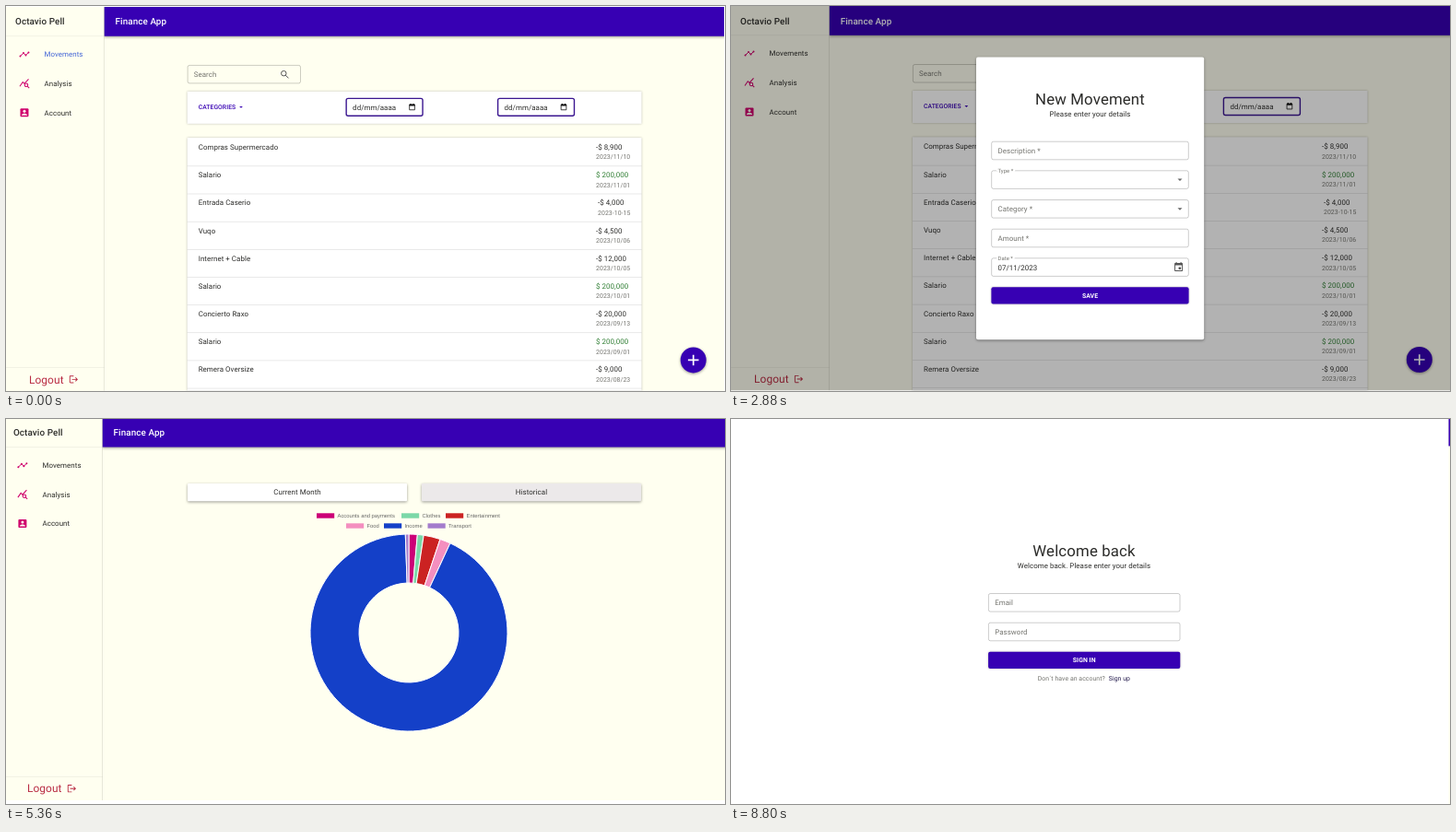
An HTML page for the animation above (8.88 s loop, 780 px wide and 418 px high).

```html
<!DOCTYPE html>
<html lang="en">
<head>
<meta charset="utf-8">
<title>Finance App</title>
<style>
html, body { margin: 0; width: 780px; height: 418px; overflow: hidden; background: #fff; }
#reel { display: flex; width: 3900px; height: 418px; animation: cuts 8880ms step-end infinite; }
#reel svg { flex: none; display: block; overflow: hidden; }
text { font-family: Roboto, "Open Sans", sans-serif; letter-spacing: .009em; text-rendering: geometricPrecision; white-space: pre; }
.chart text { font-family: "Liberation Sans", Arial, sans-serif; letter-spacing: 0; }
.bar { filter: drop-shadow(0 1.2px 1.5px rgba(0,0,0,.4)); }
.paper { filter: drop-shadow(0 .6px .8px rgba(0,0,0,.28)); }
@keyframes cuts {
  0% { transform: translateX(0); }
  17.1% { transform: translateX(-780px); }
  49.54% { transform: translateX(-1560px); }
  66.65% { transform: translateX(-2340px); }
  83.77%, 100% { transform: translateX(-3120px); }
}
</style>
</head>
<body>
<div id="reel"></div>
<script>
const IVORY = '#fffff0', PURPLE = '#3700b3', PINK = '#cf006c', INK = '#2c2c2a',
      GREY = '#74746f', RED = '#b92c43', GREEN = '#2e7d32', LINE = 'rgba(0,0,0,.25)';
const USER = 'Octavio Pell';

// cy is the middle of the capital letters
function text(x, cy, str, o = {}) {
  const { size = 7.9, fill = INK, weight = 400, anchor = 'start', extra = '' } = o;
  return `<text x="${x}" y="${cy + size * .355}" font-size="${size}" font-weight="${weight}" fill="${fill}" text-anchor="${anchor}" ${extra}>${str}</text>`;
}
const mid = (x, cy, str, o = {}) => text(x, cy, str, { ...o, anchor: 'middle' });
const rect = (x, y, w, h, fill, extra = '') =>
  `<rect x="${x}" y="${y}" width="${w}" height="${h}" fill="${fill}" ${extra}/>`;
const outline = (x, y, w, h, stroke = LINE, sw = .8) =>
  rect(x, y, w, h, 'none', `rx="2" stroke="${stroke}" stroke-width="${sw}"`);

const shapes = {
  timeline: c => `<path d="M3 16 10 9 15 14 21 8" fill="none" stroke="${c}" stroke-width="2"/>` +
    [[3, 16], [10, 9], [15, 14], [21, 8]].map(([x, y]) => `<circle cx="${x}" cy="${y}" r="2" fill="${c}"/>`).join(''),
  stats: c => `<g fill="none" stroke="${c}" stroke-width="2.1"><path d="M2 18.5 8.5 9 12 12.5 21 2.5M18.5 18 22.5 22"/><circle cx="16" cy="15.5" r="3.5"/></g>`,
  account: c => rect(3, 3, 18, 18, c, 'rx="2"') +
    `<g fill="${IVORY}"><circle cx="12" cy="9" r="3"/><path d="M6 18v-1c0-2 4-3.1 6-3.1s6 1.1 6 3.1v1z"/></g>`,
  logout: c => `<path fill="${c}" d="M17 7l-1.41 1.41L18.17 11H8v2h10.17l-2.58 2.58L17 17l5-5zM4 5h8V3H4c-1.1 0-2 .9-2 2v14c0 1.1.9 2 2 2h8v-2H4z"/>`,
  search: c => `<g fill="none" stroke="${c}" stroke-width="2"><circle cx="9.5" cy="9.5" r="5.5"/><path d="M13.5 13.5 20 20"/></g>`,
  event: c => `<path fill="${c}" d="M17 12h-5v5h5zM16 1v2H8V1H6v2H5c-1.1 0-2 .9-2 2v14c0 1.1.9 2 2 2h14c1.1 0 2-.9 2-2V5c0-1.1-.9-2-2-2h-1V1zm3 18H5V8h14z"/>`,
  picker: c => `<path fill="none" stroke="${c}" stroke-width="2.2" d="M4 5h16v16H4z"/><path fill="${c}" d="M4 4h16v5H4zM6 2h3v3H6zM15 2h3v3h-3z"/>`,
  arrow: c => `<path fill="${c}" d="M7 10l5 5 5-5z"/>`,
  person: c => `<g fill="none" stroke="${c}" stroke-width="2"><circle cx="12" cy="12" r="9"/><circle cx="12" cy="9.5" r="2.6"/><path d="M6 18.2c1.5-1.8 3.7-2.7 6-2.7s4.500.9 6 2.7"/></g>`
};
const icon = (name, cx, cy, size, color = INK) =>
  `<g transform="translate(${cx - size / 2} ${cy - size / 2}) scale(${size / 24})">${shapes[name](color)}</g>`;

// page frame: header bar and sidebar, shifted by (dx, dy), page ending at `bottom`
function shell(dx, dy, outY, bottom, active) {
  const edge = 106.6 + dx, top = 31.8 + dy;
  const items = [['Movements', 'timeline'], ['Analysis', 'stats'], ['Account', 'account']];
  return rect(0, 0, 782, bottom, IVORY) +
    rect(edge, 0, 790 - edge, top, PURPLE, 'class="bar"') +
    rect(0, 0, edge, bottom, IVORY) +
    rect(edge - .5, 0, .6, bottom, 'rgba(0,0,0,.16)') +
    rect(0, top - .2, edge, .5, 'rgba(0,0,0,.1)') +
    rect(0, outY - 13, edge, .5, 'rgba(0,0,0,.1)') +
    text(10 + dx, 16 + dy, USER, { size: 9.9, weight: 500 }) +
    text(118.7 + dx, 16 + dy, 'Finance App', { size: 9.9, weight: 500, fill: '#fff' }) +
    items.map(([label, name], i) => {
      const y = 51.5 + dy + 31.7 * i;
      return icon(name, 20 + dx, y, 12, PINK) +
        text(41.6 + dx, y, label, { fill: label === active ? '#4365d6' : INK });
    }).join('') +
    text(25 + dx, outY, 'Logout', { size: 11.9, fill: RED }) +
    icon('logout', 73.5 + dx, outY, 11, RED);
}

function dateBox(x) {
  return outline(x, 99.5, 83, 19, '#3b1690', 1.4) + text(x + 7, 109, 'dd/mm/aaaa') +
    icon('picker', x + 71.5, 108.7, 8.6, '#111');
}

const rows = [
  ['Compras Supermercado', '-$ 8,900', '2023/11/10'],
  ['Salario', '$ 200,000', '2023/11/01'],
  ['Entrada Caserio', '-$ 4,000', '2023-10-15'],
  ['Vuqo', '-$ 4,500', '2023/10/06'],
  ['Internet + Cable', '-$ 12,000', '2023/10/05'],
  ['Salario', '$ 200,000', '2023/10/01'],
  ['Concierto Raxo', '-$ 20,000', '2023/09/13'],
  ['Salario', '$ 200,000', '2023/09/01'],
  ['Remera Oversize', '-$ 9,000', '2023/08/23']
];

function movements(active) {
  const list = rows.map(([name, sum, date], i) => {
    const y = 152.5 + 30.2 * i, x = date.includes('-') ? 643 : 641;
    return text(209, y, name) +
      text(x, y, sum, { fill: sum[0] === '$' ? GREEN : INK }) +
      text(x, y + 10.8, date, { size: 6.9, fill: GREY }) +
      rect(197, y + 20.3, 493.500, .6, 'rgba(0,0,0,.15)');
  }).join('');
  return shell(0, 0, 405, 417.3, active) +
    outline(197.4, 63.5, 122.6, 19.5) + text(204, 73.5, 'Search', { fill: GREY }) +
    icon('search', 303, 73.5, 12, '#555') +
    rect(197, 92, 493.5, 35, '#fff', 'class="paper"') +
    text(209, 108.7, 'CATEGORIES', { size: 6.8, weight: 500, fill: PURPLE }) +
    icon('arrow', 255.4, 108.8, 9, PURPLE) +
    dateBox(369.7) + dateBox(534.4) +
    rect(197, 142.3, 493.5, 275, '#fff', 'class="paper"') + list +
    `<circle cx="746.8" cy="384" r="14" fill="${PURPLE}" class="bar"/>` +
    `<path d="M741 384h11.6M746.8 378.2v11.6" stroke="#fff" stroke-width="1.7"/>`;
}

// outlined input; a label sits in a gap of the top border
function field(x, y, w, { value = '', hint = '', label = '', bg = '#fff', indent = 6.8 }) {
  return outline(x, y, w, 19.6) +
    (hint && text(x + 6.8, y + 9.9, hint, { fill: GREY })) +
    (value && text(x + indent, y + 9.9, value)) +
    (label && text(x + 6.8, y + .3, label, { size: 5.9, fill: GREY, extra: `paint-order="stroke" stroke="${bg}" stroke-width="3.5"` }));
}
const button = (x, y, w, label, fill = PURPLE) =>
  rect(x, y, w, 18.2, fill, 'rx="2" class="paper"') +
  mid(x + w / 2, y + 8.9, label, { size: 6.9, weight: 600, fill: '#fff' });

function modal() {
  const x = 282.7, w = 213.6;
  return rect(0, 0, 780, 417.3, 'rgba(0,0,0,.3)') +
    rect(266, 55.4, 247.2, 306.8, '#fff', 'rx="2" class="bar"') +
    mid(389.5, 101, 'New Movement', { size: 16.8 }) +
    mid(389.5, 117.2, 'Please enter your details') +
    field(x, 147.2, w, { hint: 'Description *' }) +
    field(x, 178.8, w, { label: 'Type *' }) + icon('arrow', 487, 188.6, 12, '#666') +
    field(x, 210.5, w, { hint: 'Category *' }) + icon('arrow', 487, 220.3, 12, '#666') +
    field(x, 242.2, w, { hint: 'Amount *' }) +
    field(x, 273.8, w, { label: 'Date *', value: '07/11/2023' }) + icon('event', 485.6, 283.5, 12, '#555') +
    button(x - .3, 305.2, w + .6, 'SAVE');
}

const slices = [
  ['Accounts and payments', '#cc0077', 5, 337, 105],
  ['Clothes', '#7bd8a8', 8.7, 429, 105],
  ['Entertainment', '#cb2222', 18.5, 477, 105],
  ['Food', '#f48fbf', 24.8, 369, 116],
  ['Income', '#1440c8', 358, 410, 116],
  ['Transport', '#a47ccc', 360, 457.5, 116]
];

function analysis() {
  const cx = 437, cy = 232, R = 107, r = 54;
  const at = (deg, rad) => {
    const a = deg * Math.PI / 180;
    return `${(cx + rad * Math.sin(a)).toFixed(2)} ${(cy - rad * Math.cos(a)).toFixed(2)}`;
  };
  let from = 0;
  const ring = slices.map(([name, color, to, lx, ly]) => {
    const big = to - from > 180 ? 1 : 0;
    const d = `M${at(from, R)}A${R} ${R} 0 ${big} 1 ${at(to, R)}L${at(to, r)}A${r} ${r} 0 ${big} 0 ${at(from, r)}z`;
    from = to;
    return `<path d="${d}" fill="${color}" stroke="#fff" stroke-width="1"/>` +
      rect(lx, ly - 2.7, 19.2, 5.4, color) +
      text(lx + 22.5, ly, name, { size: 5.85, fill: '#666' });
  }).join('');
  return shell(-2.1, -1.3, 401.2, 414, '') +
    rect(197, 70, 238, 19.2, '#fff', 'rx="1" class="bar"') + mid(316, 79.5, 'Current Month') +
    rect(451, 70, 238, 19.2, '#ece9ea', 'rx="1" class="bar"') + mid(570, 79.5, 'Historical') +
    `<g class="chart">${ring}</g>`;
}

function account() {
  const x = 328.2, w = 229.2, bg = IVORY;
  return shell(-5.2, -2.4, 402.5, 416, '') +
    icon('person', 391, 72, 24, '#222') + text(410, 71.3, USER, { size: 16.8 }) +
    field(x, 107.1, w, { label: 'Name', value: USER, bg }) +
    field(x, 138.8, w, { label: 'Birthday', value: '04/03/2000', bg }) + icon('event', 546.5, 148.4, 12, '#555') +
    field(x, 170.4, w, { label: 'Email', value: 'octaviopell@example.com', bg }) +
    field(x, 202.1, w, { label: 'Phone', value: '+54 11 5550 0123', bg, indent: 28 }) +
    rect(338.7, 208.8, 10.4, 6.3, '#6fb1e6') + rect(338.7, 210.9, 10.4, 2.1, '#fff') +
    `<circle cx="343.9" cy="211.95" r=".7" fill="#e8b84a"/>` +
    button(x - .3, 233.6, w + .6, 'SAVE', '#9482f6');
}

function login() {
  const x = 279.4, w = 207.6, c = 383;
  return rect(0, 0, 778.5, 418, '#fff') + rect(778.5, 0, 1.5, 418, IVORY) + rect(778.5, 0, 1.5, 29.4, PURPLE) +
    mid(c, 143.2, 'Welcome back', { size: 16.8 }) +
    mid(c, 159.5, 'Welcome back. Please enter your details') +
    field(x, 189.5, w, { hint: 'Email' }) +
    field(x, 221.2, w, { hint: 'Password' }) +
    button(x - .3, 252.8, w + .6, 'SIGN IN') +
    text(332.7, 282, 'Don´t have an account?', { size: 6.9, fill: GREY }) +
    text(409.8, 282, 'Sign up', { size: 6.9, fill: '#241a4d' });
}

const screens = [
  `<g transform="translate(0 1) scale(.9985)">${movements('Movements')}</g>` + rect(779, 0, 1, 418, '#fff') + rect(0, 0, 780, 1, '#fff'),
  movements('') + modal(),
  analysis(),
  account(),
  login()
];
document.getElementById('reel').innerHTML = screens
  .map(s => `<svg width="780" height="418" viewBox="0 0 780 418">${rect(0, 0, 780, 418, '#fff')}${s}</svg>`).join('');
</script>
</body>
</html>
```
